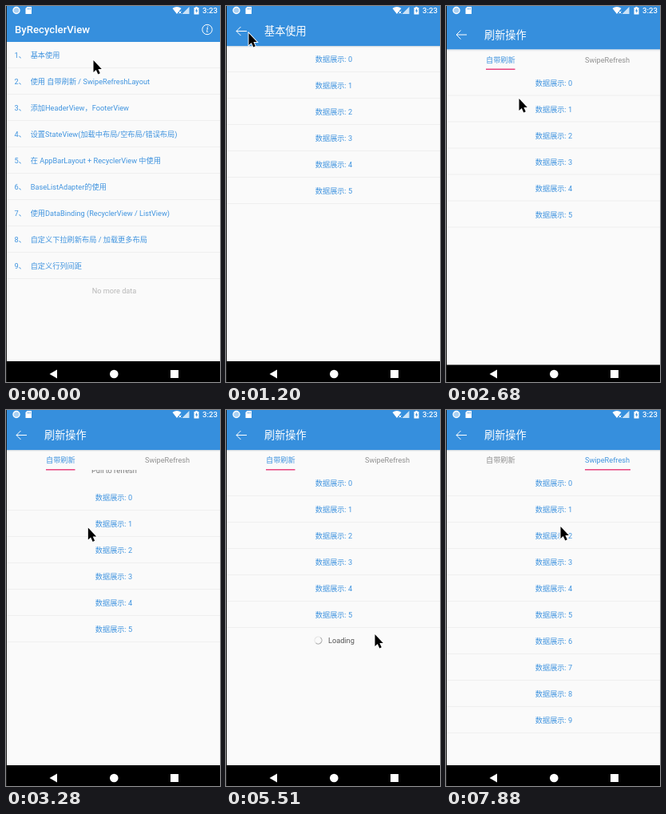
Animation, 268 px wide and 471 px high, one loop 8000 ms. Source, as an HTML page:

```html
<!DOCTYPE html>
<html lang="zh-CN">
<head>
<meta charset="utf-8">
<title>RecyclerView demo</title>
<style>
html, body { margin: 0; width: 100%; height: 100%; overflow: hidden; background: #fafafa; }
svg { display: block; width: 100vw; height: 100vh; }
text { font: 9.2px Roboto, "Noto Sans CJK SC", "Noto Sans CJK", sans-serif; white-space: pre; }
</style>
</head>
<body>
<svg id="stage" viewBox="0 0 268 471" preserveAspectRatio="none"></svg>
<script>
const LOOP = 8000, STEP = 148.8;
const BLUE = '#368fdd', LINK = '#4094df', GREY = '#909090', PINK = '#e8437f', PAPER = '#fafafa';
const ROW = 33, PAGE_W = 268;
const stage = document.getElementById('stage');

const menu = [
  '基本使用',
  '使用 自带刷新 / SwipeRefreshLayout',
  '添加HeaderView，FooterView',
  '设置StateView(加载中布局/空布局/错误布局)',
  '在 AppBarLayout + RecyclerView 中使用',
  'BaseListAdapter的使用',
  '使用DataBinding (RecyclerView / ListView)',
  '自定义下拉刷新布局 / 加载更多布局',
  '自定义行列间距'
];

// Key lists: [step, value, ...], linear in between.
const cursorKeys = [[2, 109, 67], [5, 109, 63], [8, 28, 33], [9, 20, 30], [11, 20, 30],
  [15, 91, 115], [20, 91, 115], [21, 92, 122], [27, 154, 269], [28, 157, 275], [32, 165, 322],
  [36, 174, 300], [37, 186, 280], [41, 187, 284], [43, 187, 284], [44, 140, 289], [45, 64, 294],
  [47, 22, 298], [50, 115, 211], [51, 115, 211], [53, 143, 145]];
const pullKeys = [[20, 0], [24, 36], [25, 40], [26, 33], [30, 33], [32, 0]];
const swipeKeys = [[43, 0], [44, 6], [45, 36], [46, 140], [47, 225], [48, 258], [49, 268]];

function at(keys, k) {
  if (k <= keys[0][0]) return keys[0].slice(1);
  for (let i = 1; i < keys.length; i++) {
    const a = keys[i - 1], b = keys[i];
    if (k <= b[0]) {
      const p = (k - a[0]) / (b[0] - a[0]);
      return a.slice(1).map((v, j) => v + (b[j + 1] - v) * p);
    }
  }
  return keys[keys.length - 1].slice(1);
}

const rect = (x, y, w, h, fill) => `<rect x="${x}" y="${y}" width="${w}" height="${h}" fill="${fill}"/>`;
const text = (s, x, mid, fill, extra = '') => `<text x="${x}" y="${mid + 4}" fill="${fill}" ${extra}>${s}</text>`;
const centered = (s, x, mid, fill) => text(s, x, mid, fill, 'text-anchor="middle"');
const line = y => rect(0, y, PAGE_W, 1, '#efefef');
const move = (x, y, s) => `<g transform="translate(${x} ${y})">${s}</g>`;

function dataRows(count, mid) {
  let s = '';
  for (let i = 0; i < count; i++) {
    s += centered('数据展示: ' + i, 135, mid + i * ROW, LINK) + line(mid + 16 + i * ROW);
  }
  return s;
}

function spinner(x, y, k) {
  return `<g transform="translate(${x} ${y}) rotate(${k * 40})" fill="none">
    <circle r="4.5" stroke="#e2e2e2"/><path d="M0 -4.5A4.5 4.5 0 0 1 0 4.5" stroke="#aaa"/></g>`;
}

function header(title) {
  return rect(0, 0, PAGE_W, 50, BLUE) + rect(0, 50, PAGE_W, 1, '#d4dce3') + rect(0, 51, PAGE_W, 1, '#eef0f2') +
    '<path d="M26 31.5H13M18.5 26L13 31.5L18.5 37" fill="none" stroke="#fff"/>' +
    text(title, 48, 32, '#fff', 'style="font-size:13.2px"');
}

function mainPage(pressed) {
  let s = rect(0, 0, PAGE_W, 45, BLUE) +
    text('ByRecyclerView', 11, 30, '#fff', 'style="font-size:13.2px;font-weight:500"') +
    '<circle cx="252" cy="29.5" r="6.2" fill="none" stroke="#fff"/>' +
    text('i', 250.4, 29, '#fff', 'style="font:italic 10px Noto Serif,serif"');
  if (pressed >= 0) s += rect(0, 45 + pressed * ROW, PAGE_W, 32, '#efefef');
  menu.forEach((label, i) => {
    const y = 61 + i * ROW;
    s += text(i + 1 + '、', 10.5, y, LINK) + text(label, 30.7, y, LINK) + line(y + 16);
  });
  return s + centered('No more data', 135.5, 356, '#b8b8b8');
}

const basicPage = pressed => dataRows(6, 66) + header('基本使用') +
  (pressed ? '<circle cx="19" cy="31.5" r="13" fill="#fff" fill-opacity=".18"/>' : '');

function refreshList(k) {
  const [pull] = at(pullKeys, k);
  const loaded = k >= 39;
  let s = '';
  if (k >= 43 && k <= 46) {
    s += rect(0, 273, 268, 32, '#f2f2f2') + '<circle cx="187" cy="286" r="14" fill="#e8e8e8"/>';
  }
  s += dataRows(loaded ? (k >= 43 ? 11 : 10) : 6, 91 + pull);
  if (pull > 0) {
    const y = 57 + pull;
    s += k < 26 ? centered('Pull to refresh', 135.5, y, '#777')
      : spinner(99, y + 1, k) + text('Refreshing', 113, y, '#777');
  }
  if (k >= 36 && !loaded) s += spinner(115.5, 288.5, k) + text('Loading', 128, 288, '#555');
  if (loaded) s += rect(267, 75, 3, 322, '#b5b5b5');
  return s;
}

function refreshPage(k) {
  const [swipe] = at(swipeKeys, k);
  const p = swipe / PAGE_W, second = p > .5;
  const left = 50 + 124 * p, right = 86.5 + 144.5 * p;
  return `<g clip-path="url(#list)">${move(-swipe, 0, refreshList(k))}` +
    (swipe ? move(PAGE_W - swipe, 0, rect(0, 75, PAGE_W, 380, PAPER)) : '') +
    (second ? move(PAGE_W - swipe, 0, dataRows(10, 91)) : '') + '</g>' +
    text('自带刷新', 50, 62, second ? GREY : LINK) +
    text('SwipeRefresh', 174, 62, second ? LINK : GREY) +
    rect(left, 74, right - left, 1.5, PINK) + header('刷新操作');
}

function statusBar() {
  return rect(0, 0, PAGE_W, 13, BLUE) +
    '<circle cx="13" cy="5.5" r="4" fill="#a9d0f3" stroke="#fff" stroke-width="1.4"/>' +
    '<path d="M26.5 1H32V10H24.5V3Z" fill="#fff"/>' +
    '<path d="M27 2.5V4.5M28.7 2.5V4.5M30.4 2.5V4.5" stroke="#368fdd" stroke-width=".7"/>' +
    '<path d="M208.5 3Q214 -.8 219.5 3L214 10Z" fill="#fff"/>' +
    '<path d="M229.5 1V10H220.5Z" fill="#fff" fill-opacity=".75"/>' +
    '<path d="M216.5 6.5L219.5 9.5M219.5 6.5L216.5 9.5" stroke="#fff"/>' +
    '<path d="M235.5 2H237.3V1H239.7V2H241.5V10.5H235.5Z" fill="#fff"/>' +
    '<path d="M239 3L237 6.5H238.4V9L240.3 5.6H239Z" fill="#368fdd"/>' +
    text('3:23', 246, 5, '#fff', 'style="font-size:9.6px;font-weight:500"');
}

const navBar = y => rect(0, y, PAGE_W, 471 - y, '#000') +
  '<g fill="#fff"><path d="M54.5 461L64 455.5V466.5Z"/><circle cx="135.3" cy="461" r="5.3"/>' +
  '<rect x="206" y="456" width="10" height="10"/></g>';

const pointer = (x, y) => move(x, y,
  '<path d="M.5 1V16L3.8 13L6.3 18.4L8.8 17.3L6.4 12H10.8Z" fill="#000" stroke="#fff" stroke-width="1.8" paint-order="stroke"/>');

function page(k) {
  if (k < 5) return mainPage(k >= 3 ? 0 : -1);
  if (k < 11) return basicPage(k >= 9);
  if (k < 18) return mainPage(-1);
  return refreshPage(k);
}

function draw(k) {
  const dy = k === 5 || k === 18 ? 4.5 : 0; // opening page starts slightly low
  stage.innerHTML = '<clipPath id="list"><rect y="75" width="268" height="380"/></clipPath>' +
    rect(0, 0, PAGE_W, 471, PAPER) + move(0, dy, page(k)) + navBar(445 + dy) + statusBar() +
    rect(0, 0, 1, 471, '#1c1c1c') + pointer(...at(cursorKeys, k));
}

let shown = -1;
const start = performance.now();
function tick(now) {
  const t = Math.max(0, now - start) % LOOP;
  const k = Math.min(53, Math.floor((t + 8) / STEP));
  if (k !== shown) draw(shown = k);
  requestAnimationFrame(tick);
}
draw(0);
requestAnimationFrame(tick);
</script>
</body>
</html>
```
